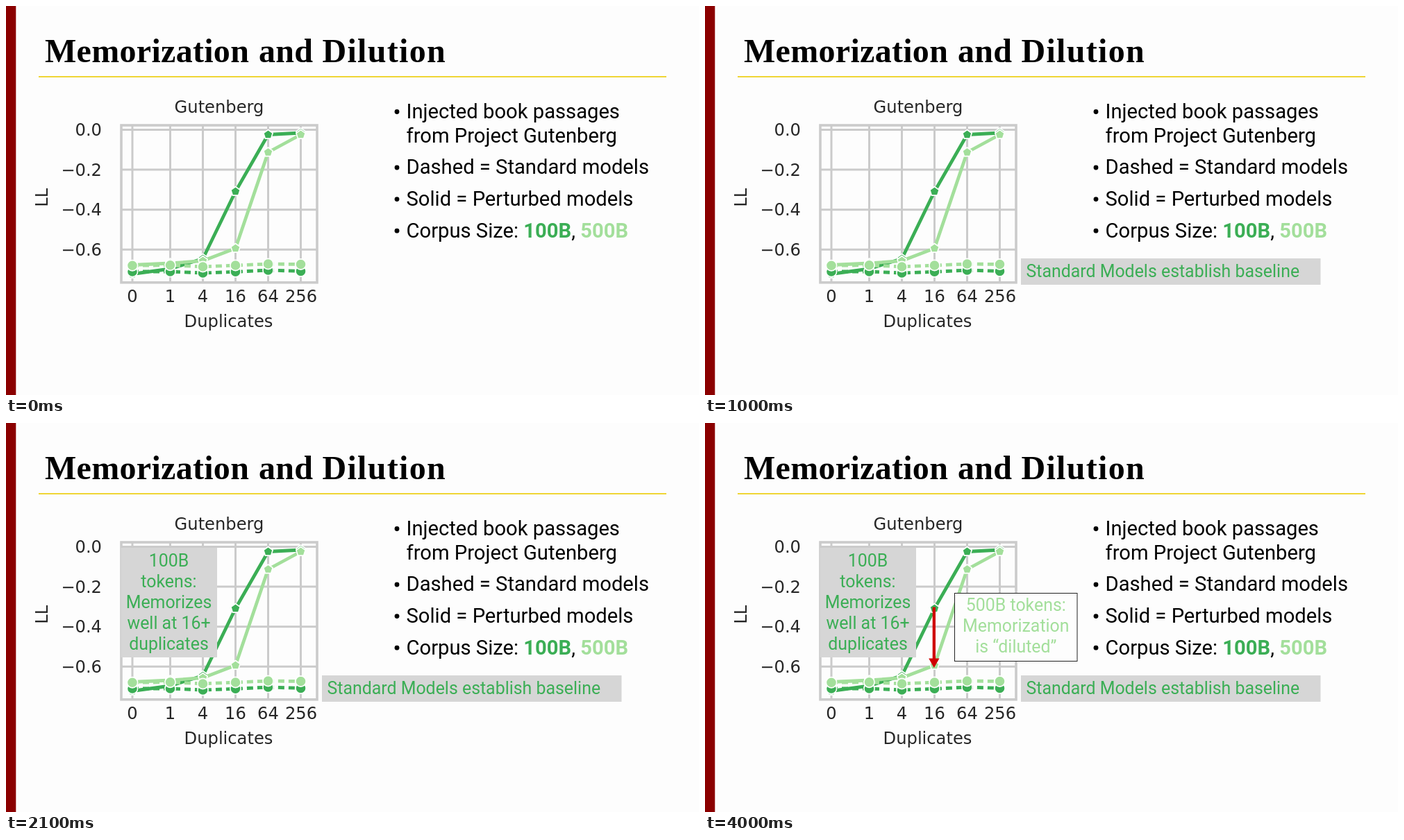
Recreate the animation shown at these times as an HTML page. Size 998 by 561 pixels, loop 4020 ms.

```html
<!DOCTYPE html>
<html lang="en">
<head>
<meta charset="utf-8">
<title>Memorization and Dilution</title>
<style>
  html, body { margin: 0; width: 100%; height: 100%; overflow: hidden; background: #fdfdfd; }
  svg { display: block; width: 998px; height: 561px; --dark: #3bae55; --light: #a3df9b; }
  .title { font: bold 48px "Liberation Serif", serif; letter-spacing: .3px; }
  .title .wide { letter-spacing: 1.3px; }
  .bullets { font: 29.2px Roboto, sans-serif; }
  .bullets .size { font-weight: bold; }
  .chart { font: 24.2px "DejaVu Sans", sans-serif; fill: #262626; }
  .grid { fill: none; stroke: #cbcbcb; stroke-width: 3; }
  .mid { text-anchor: middle; }
  .end { text-anchor: end; }
  .line { fill: none; stroke-width: 4.8; stroke-linejoin: round; }
  .solid { stroke-linecap: round; }
  .dashed { stroke-dasharray: 9 6; }
  .dark { stroke: var(--dark); }
  .light { stroke: var(--light); }
  .dark.solid { marker: url(#pentDark); }
  .light.solid { marker: url(#pentLight); }
  .dark.dashed { marker: url(#dotDark); }
  .light.dashed { marker: url(#dotLight); }
  marker { overflow: visible; }
  marker * { stroke: #fff; stroke-width: 1.6; }
  .fd { fill: var(--dark); }
  .fl { fill: var(--light); }
  .note { font: 24.9px Roboto, sans-serif; visibility: hidden; animation: 4020ms step-end infinite; }
  .note .box { fill: #d6d6d6; }
  #baseline { animation-name: baseline; }
  #memorized { animation-name: memorized; }
  #diluted { animation-name: diluted; }
  @keyframes baseline { 0% { visibility: hidden } 24.85%, 100% { visibility: visible } }
  @keyframes memorized { 0% { visibility: hidden } 52.2%, 100% { visibility: visible } }
  @keyframes diluted { 0% { visibility: hidden } 77.1%, 100% { visibility: visible } }
</style>
</head>
<body>
<svg viewBox="0 0 998 561">
  <defs>
    <path id="pent" d="M0-7 6.66-2.16 4.11 5.66H-4.11L-6.66-2.16Z"/>
    <marker id="pentDark" markerUnits="userSpaceOnUse"><use href="#pent" class="fd"/></marker>
    <marker id="pentLight" markerUnits="userSpaceOnUse"><use href="#pent" class="fl"/></marker>
    <marker id="dotDark" markerUnits="userSpaceOnUse"><circle r="7.6" class="fd"/></marker>
    <marker id="dotLight" markerUnits="userSpaceOnUse"><circle r="7.6" class="fl"/></marker>
  </defs>

  <rect width="998" height="561" fill="#fdfdfd"/>
  <rect width="14.3" height="561" fill="#8b0000"/>
  <path d="M47 102H951" stroke="#efd534" stroke-width="1.8"/>
  <text class="title" y="80.5"><tspan x="56">Memorization</tspan> <tspan x="364">and</tspan> <tspan class="wide" x="455.5">Dilution</tspan></text>

  <g class="chart">
    <g class="grid">
      <path d="M182 172V399M236.5 172V399M283.5 172V399M330.5 172V399M377.5 172V399M424.5 172V399"/>
      <path d="M166 178.5H448M166 236H448M166 293.7H448M166 351.3H448"/>
      <rect x="166" y="172" width="282" height="226.8" stroke-width="3.6"/>
    </g>
    <polyline class="line solid dark" points="182,386.5 236.5,379 283.5,364.5 330.5,267.5 377.5,185.5 424.5,183"/>
    <polyline class="line solid light" points="182,373.5 236.5,371 283.5,367.5 330.5,349.5 377.5,211 424.5,185.5"/>
    <polyline class="line dashed dark" points="182,383 236.5,383 283.5,385 330.5,383.3 377.5,381 424.5,382.5"/>
    <polyline class="line dashed light" points="182,374.3 236.5,373.8 283.5,376 330.5,374 377.5,372 424.5,372.5"/>

    <text class="mid" x="307" y="154.3">Gutenberg</text>
    <text class="mid" x="320.5" y="463">Duplicates</text>
    <text class="mid" transform="translate(59.5 276.3) rotate(-90)">LL</text>
    <g class="end">
      <text x="138" y="187">0.0</text>
      <text x="138" y="244.7">−0.2</text>
      <text x="138" y="302.3">−0.4</text>
      <text x="138" y="360">−0.6</text>
    </g>
    <g class="mid">
      <text x="182" y="427">0</text>
      <text x="236.5" y="427">1</text>
      <text x="283.5" y="427">4</text>
      <text x="330.5" y="427">16</text>
      <text x="377.5" y="427">64</text>
      <text x="425" y="427">256</text>
    </g>
  </g>

  <g class="bullets">
    <circle cx="563" cy="152.5" r="3.4"/>
    <text x="576.5" y="161.8">Injected book passages</text>
    <text x="576.5" y="196.9">from Project Gutenberg</text>
    <circle cx="563" cy="233" r="3.4"/>
    <text x="576.5" y="242.3">Dashed = Standard models</text>
    <circle cx="563" cy="278.6" r="3.4"/>
    <text x="576.5" y="287.9">Solid = Perturbed models</text>
    <circle cx="563" cy="324.2" r="3.4"/>
    <text x="576.5" y="333.5">Corpus Size: <tspan class="size fd">100B</tspan>, <tspan class="size fl">500B</tspan></text>
  </g>

  <g class="note" id="baseline">
    <rect class="box" x="455" y="364" width="431.5" height="38"/>
    <text class="fd" x="462.5" y="391.3">Standard Models establish baseline</text>
  </g>

  <g class="note" id="memorized">
    <rect class="box" x="165.5" y="180" width="138.5" height="158"/>
    <g class="fd mid">
      <text x="234.5" y="207.3">100B</text>
      <text x="234.5" y="237.3">tokens:</text>
      <text x="234.5" y="267.3">Memorizes</text>
      <text x="234.5" y="297.3">well at 16+</text>
      <text x="234.5" y="327.3">duplicates</text>
    </g>
  </g>

  <g class="note" id="diluted">
    <rect x="359.5" y="245.5" width="176.5" height="98" fill="#fdfdfd" stroke="#222"/>
    <g class="fl mid">
      <text x="447.8" y="271.3">500B tokens:</text>
      <text x="447.8" y="301.3">Memorization</text>
      <text x="447.8" y="331.3">is “diluted”</text>
    </g>
    <path d="M327.7 265.5H332V339.5H337.5L329.8 353 322.2 339.5H327.7Z" fill="#cf0000"/>
  </g>
</svg>
</body>
</html>
```
